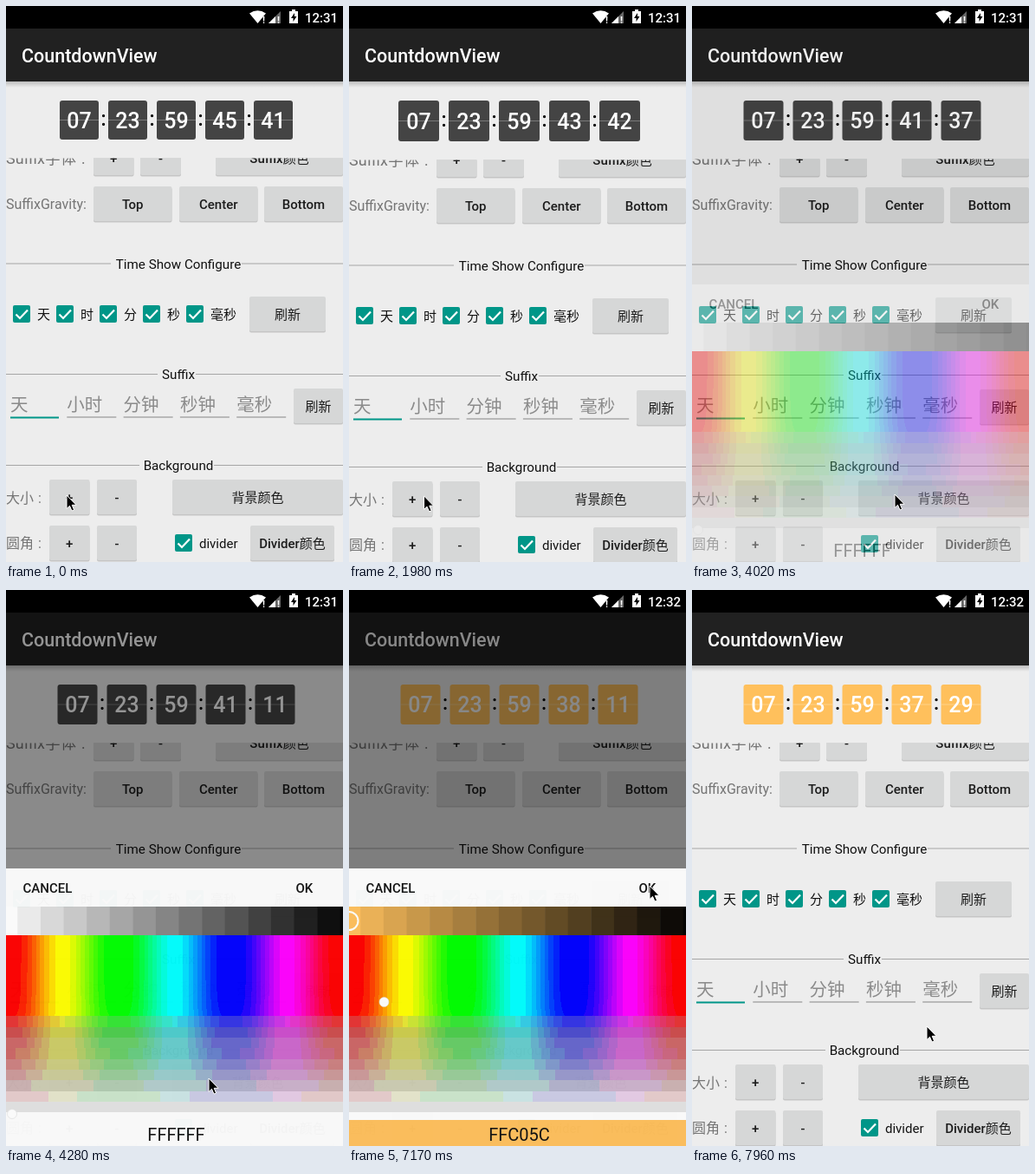
An HTML page with a canvas that plays this animation: 389x641 px, repeating every 8 s.

```html
<!DOCTYPE html>
<html lang="zh-CN">
<head>
<meta charset="utf-8">
<title>CountdownView</title>
<style>
html, body { margin: 0; width: 100%; height: 100%; overflow: hidden; background: #ededed; }
#stage { position: relative; width: 389px; height: 641px; overflow: hidden; }
svg, #panel { position: absolute; left: 0; top: 0; width: 389px; height: 641px; }
canvas { position: absolute; left: 0; top: 398px; }
text { font-family: Roboto, "Noto Sans CJK SC", "Noto Sans CJK", sans-serif; white-space: pre; }
</style>
</head>
<body>
<div id="stage">
  <svg id="app" viewBox="0 0 389 641"></svg>
  <div id="panel">
    <svg id="sheet" viewBox="0 0 389 641"></svg>
    <canvas id="hues" width="389" height="204"></canvas>
    <svg id="marks" viewBox="0 0 389 641"></svg>
  </div>
  <svg id="pointer" viewBox="0 0 389 641"></svg>
</div>
<script>
const $ = id => document.getElementById(id);
const TEAL = '#009688', PICK = [255, 192, 92], WHITE = [255, 255, 255];

const rect = (x, y, w, h, fill, more = '') =>
  `<rect x="${x}" y="${y}" width="${w}" height="${h}" fill="${fill}" ${more}/>`;
const text = (x, y, size, str, fill = '#111', more = '') =>
  `<text x="${x}" y="${y}" font-size="${size}" fill="${fill}" ${more}>${str}</text>`;
const mid = 'text-anchor="middle" font-weight="500"';

const button = (x, y, w, label) =>
  rect(x, y + 1.5, w, 40, '#000', 'rx="2" opacity=".17"') +
  rect(x, y, w, 40, '#d6d7d7', 'rx="2"') +
  text(x + w / 2, y + 25.5, 15, label, '#1c1c1c', mid);

const check = (x, y, label) =>
  rect(x, y, 20, 20, TEAL, 'rx="2"') +
  `<path d="M${x + 3.5} ${y + 10.5}l4.5 4.5 9-9.5" fill="none" stroke="#fff" stroke-width="2.2"/>` +
  text(x + 28, y + 15.5, 15, label);

const heading = (y, label, left, right) =>
  rect(0, y - .5, left, 1, '#a6a6a6') + rect(right, y - .5, 389 - right, 1, '#a6a6a6') +
  text(199, y + 5.5, 15.2, label, '#111', 'text-anchor="middle"');

const label = (y, str, size, colon) =>
  text(0, y, size, str, '#757575') + text(colon, y, size, ':', '#757575');

function statusBar() {
  return rect(0, 0, 389, 26, '#000') +
    '<path d="M281 8.5Q290.5 2 300 8.5L290.5 20Z" fill="#fff"/>' +
    '<path d="M303 20L317 6V20Z" fill="#666"/><path d="M303 20L311 12V20Z" fill="#fff"/>' +
    text(296, 20, 11, '!', '#fff', 'font-weight="700"') +
    text(313, 20, 11, '!', '#fff', 'font-weight="700"') +
    '<path d="M327 6h3v-2h4v2h3v14h-10Z" fill="#fff"/>' +
    '<path d="M333 8l-4 6h2.5v4l4-6h-2.5Z" fill="#000"/>' +
    text(345, 18.5, 15, '12:31', '#fff', 'id="clock" font-weight="500"');
}

function form() {
  let s = label(182, 'Suffix字体', 18, 87) +
    button(101, 155, 46.5, '+') + button(155, 155, 47, '-') + button(242, 155, 147, 'Suffix颜色') +
    text(0, 234, 16, 'SuffixGravity:', '#757575') +
    button(101, 208, 90.5, 'Top') + button(200, 208, 90.5, 'Center') + button(298, 208, 91, 'Bottom') +
    heading(297, 'Time Show Configure', 121, 272);
  [...'天时分秒', '毫秒'].forEach((c, i) => s += check(8 + 50 * i, 345, c));
  s += button(281, 335, 88, '刷新') + heading(424.5, 'Suffix', 175, 219);
  ['天', '小时', '分钟', '秒钟', '毫秒'].forEach((c, i) => {
    const x = 5 + 65.3 * i;
    s += text(x, 467, 20.5, c, '#8b8b8b') +
      (i ? rect(x, 473.5, 57, 1, '#858585') : rect(x, 473.5, 56, 2, TEAL));
  });
  return s + rect(5, 449, 2, 22, TEAL, 'id="caret"') +
    button(332, 441, 57, '刷新') + heading(529.5, 'Background', 154, 240) +
    label(572.5, '大小', 16, 37) + button(50, 546, 46.5, '+') + button(105, 546, 46, '-') +
    button(192, 546, 197, '背景颜色') +
    label(625, '圆角', 16, 37) + button(50, 599, 46.5, '+') + button(105, 599, 46, '-') +
    check(195, 609, 'divider') + button(282, 599, 97, 'Divider颜色');
}

$('app').innerHTML =
  '<defs><linearGradient id="shade" x2="0" y2="1"><stop stop-color="#bdbdbd"/>' +
  '<stop offset="1" stop-color="#ededed"/></linearGradient>' +
  '<clipPath id="view"><rect id="viewTop" width="389" height="480"/></clipPath></defs>' +
  rect(0, 0, 389, 641, '#ededed') + rect(0, 87, 389, 7, 'url(#shade)') +
  rect(0, 26, 389, 61, '#212121') +
  text(18, 65, 21.5, 'CountdownView', '#fff', 'font-weight="500"') +
  '<g id="timer"></g>' +
  `<g clip-path="url(#view)"><g id="form">${form()}</g></g>` +
  rect(0, 26, 389, 615, '#000', 'id="dim"') + statusBar();

$('sheet').innerHTML = rect(0, 321, 389, 320, '#fdfdfd') +
  text(19.5, 349, 15, 'CANCEL', '#111', 'font-weight="500"') +
  text(334.5, 349, 15, 'OK', '#111', 'font-weight="500"') +
  '<g id="strip"></g>' + rect(0, 611, 389, 30, '#fff', 'id="swatch"') +
  text(196.5, 635, 20, '', '#111', 'id="hex" text-anchor="middle"');

$('marks').innerHTML =
  '<circle cx="0" cy="381.5" r="10.5" fill="none" stroke="#fff" stroke-width="2"/>' +
  '<circle id="dot" r="5.5" fill="#fff" stroke="#ddd" stroke-width=".6"/>';

$('pointer').innerHTML = '<path id="arrow" d="M0 0V15.5L3.5 12.3L6 18L8.6 17L6.2 11.3H11Z" ' +
  'fill="#000" stroke="#fff" stroke-width="1"/>';

const unit = v => Math.max(0, Math.min(1, v));
const ramp = (n, a, b) => unit((n - a) / (b - a));

// Hue across in coarse steps; below the vivid part it fades to grey in rows.
function paintHues() {
  const g = $('hues').getContext('2d'), img = g.createImageData(389, 204);
  const vivid = 93, rows = 9;
  for (let y = 0, p = 0; y < 204; y++) {
    const low = y >= vivid, steps = low ? 10 : 8;
    const u = Math.floor(ramp(y, vivid, 204) * rows) / rows;
    const sat = low ? .62 * unit(1 - u / .85) : 1 - .06 * (y / vivid) ** 5;
    const grey = low ? .62 + .3 * u : 1;
    for (let x = 0; x < 389; x++) {
      const h = x / 389 * 6;
      for (const c of [Math.abs(h - 3) - 1, 2 - Math.abs(h - 2), 2 - Math.abs(h - 4)]) {
        const k = ramp(unit(c), .13, 1), pure = k * k * (3 - 2 * k);
        const v = pure * sat + grey * (1 - sat);
        img.data[p++] = sat ? Math.round(v * steps) / steps * 255 : v * 255;
      }
      img.data[p++] = 255;
    }
  }
  g.putImageData(img, 0, 0);
}

const rgb = (c, k = 1) => `rgb(${c.map(v => Math.round(v * k))})`;

function setColor(c) {
  const w = 26.6;
  let s = '';
  for (let i = 0; i < 16; i++) {
    const x = Math.max(0, (i - .5) * w);
    s += rect(x, 365, Math.min(389 - x, w + .5), 33, rgb(c, Math.max(0, 1 - i * w / 389)));
  }
  $('strip').innerHTML = s;
  $('swatch').setAttribute('fill', c === WHITE ? '#fdfdfd' : rgb(c));
  $('hex').textContent = c.map(v => v.toString(16).padStart(2, '0')).join('').toUpperCase();
  $('dot').setAttribute('cx', c === WHITE ? 7 : 40.5);
  $('dot').setAttribute('cy', c === WHITE ? 604 : 475);
}

function drawTimer(seconds, size, fill) {
  const left = 196.5 - (size * 5 + 44) / 2, cy = 109 + size / 2;
  const hundredths = Math.round(seconds * 100);
  const parts = [7, 23, 59, Math.floor(hundredths / 100), hundredths % 100];
  $('timer').innerHTML = parts.map((v, i) => {
    const x = left + i * (size + 11);
    return rect(x, 109, size, size, fill, 'rx="3"') +
      text(x + size / 2, cy + 9, 25, String(v).padStart(2, '0'), '#fff', mid) +
      rect(x, cy - .5, size, 1, '#fff', 'opacity=".28"') +
      (i < 4 ? text(x + size + 5.5, cy + 6, 23, ':', '#000', mid) : '');
  }).join('');
}

// Keys are [tick, values...]; linear in between.
function track(keys, n) {
  let i = 1;
  while (i < keys.length - 1 && keys[i][0] < n) i++;
  const a = keys[i - 1], b = keys[i], p = (n - a[0]) / (b[0] - a[0]);
  return a.slice(1).map((v, j) => v + (b[j + 1] - v) * p);
}

const COUNT = [[0, 45.41], [10, 44.49], [32, 42.52], [48, 41.11], [62, 39.83], [81, 38.11], [90, 37.29]];
const MOUSE = [[0, 70, 564], [20, 70, 564], [27, 128, 567], [34, 128, 567], [40, 234, 563],
  [50, 234, 563], [58, 39, 473], [63, 39, 473], [68, 257, 398], [75, 347, 341],
  [82, 347, 341], [88, 276, 495], [90, 271, 503]];

let shown;
function render(t) {
  const n = t < 1710 ? Math.floor(t / 90) : Math.min(90, 19 + Math.floor((t - 1710) / 88));
  const grow = n < 3 ? 0 : n < 7 ? 1 : n < 30 ? 2 : 1;

  drawTimer(track(COUNT, n)[0], 45 + grow, n < 80 ? '#444' : rgb(PICK));
  $('form').setAttribute('transform', `translate(0 ${grow})`);
  $('viewTop').setAttribute('y', 175.5 + grow);
  $('clock').textContent = n < 80 ? '12:31' : '12:32';
  $('caret').setAttribute('opacity', (n < 44 || n > 85) && t % 1000 > 50 && t % 1000 < 500 ? 1 : 0);

  const closing = n >= 80;
  $('dim').setAttribute('opacity', .6 * (closing ? 1 - ramp(n, 80, 84.6) : ramp(n, 44.5, 49.5)));
  $('panel').style.opacity = 1 - (closing ? ramp(n, 80, 85.5) : 1 - ramp(n, 44, 49)) ** 2;

  const color = n < 60 ? WHITE : PICK;
  if (color !== shown) setColor(shown = color);

  $('arrow').setAttribute('transform', `translate(${track(MOUSE, n)})`);
}

paintHues();
const start = performance.now();
function tick() {
  render((performance.now() - start) % 8000);
  requestAnimationFrame(tick);
}
tick();
</script>
</body>
</html>
```
